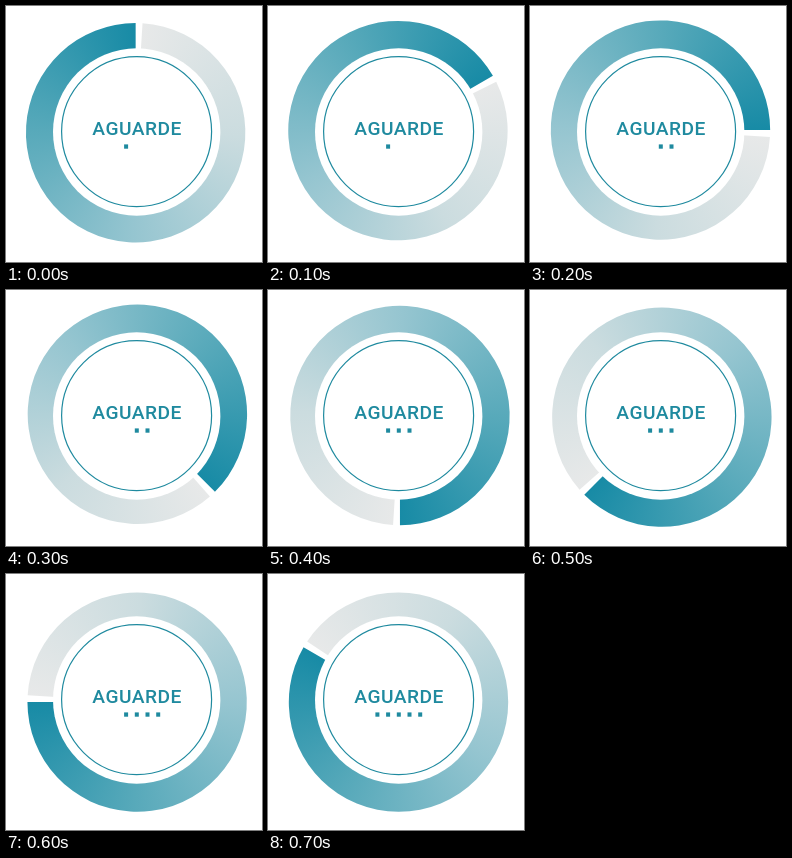
An HTML page with a canvas that plays this animation: 256x256 px, repeating every 0.8 s.

```html
<!DOCTYPE html>
<html lang="pt">
<head>
<meta charset="utf-8">
<title>Aguarde</title>
<style>
html, body { margin: 0; height: 100%; overflow: hidden; background: #fff; }
canvas { display: block; }
</style>
</head>
<body>
<canvas id="stage" width="256" height="256"></canvas>
<script>
const ctx = document.getElementById('stage').getContext('2d');
const STEP = 100, STEPS = 8;
const TEAL = '#1f8a9f';
const SHADES = ['#e8e9e9', '#cbdcdf', '#95c5d0', '#57a9ba', '#168aa5'];
const GAP = 3.6;

const rad = deg => deg * Math.PI / 180;

function disc(x, y, r, from = 0, to = 2 * Math.PI) {
  ctx.beginPath();
  ctx.arc(x, y, r, from, to);
}

// The ring wobbles around a fixed round hole while it turns
function drawRing(angle) {
  const phase = rad(angle - 16);
  const x = 130.8 - 1.2 * Math.cos(phase);
  const y = 126.1 - 2.1 * Math.sin(phase);
  const start = rad(angle + GAP - 90), end = rad(angle + 270);
  const shade = ctx.createConicGradient(rad(angle + GAP / 2 - 90), x, y);
  SHADES.forEach((c, i) => shade.addColorStop(i / (SHADES.length - 1), c));
  ctx.fillStyle = shade;
  disc(x, y, 109.7, start, end);
  ctx.lineTo(x, y);
  ctx.fill();
  ctx.fillStyle = '#fff';
  disc(130.7, 126, 83.7);
  ctx.fill();
}

function drawCentre(dots) {
  ctx.strokeStyle = ctx.fillStyle = TEAL;
  ctx.lineWidth = 1.2;
  disc(130.6, 125.6, 75);
  ctx.stroke();
  ctx.font = '500 19.2px Roboto, sans-serif';
  ctx.letterSpacing = '0.5px';
  ctx.textAlign = 'center';
  ctx.fillText('AGUARDE', 131.1, 128.8);
  const slot = Math.min(dots, (6 - dots) >> 1);
  for (let i = slot; i < slot + dots; i++) {
    ctx.fillRect(107.4 + i * 10.7, 138.4, 4, 4.3);
  }
}

function draw(time) {
  const i = Math.floor(time / STEP) % STEPS;
  // Eighths of a turn, with wider jumps to and from the top
  const angle = i && Math.min(Math.max(i * 45, 60), 300);
  // A dot every second step, then one per step at the end
  const dots = Math.max(1 + (i >> 1), i - 2);
  ctx.fillStyle = '#fff';
  ctx.fillRect(0, 0, 256, 256);
  drawRing(angle);
  drawCentre(dots);
}

const begin = performance.now();
function tick() {
  draw(performance.now() - begin);
  requestAnimationFrame(tick);
}
tick();
</script>
</body>
</html>
```
